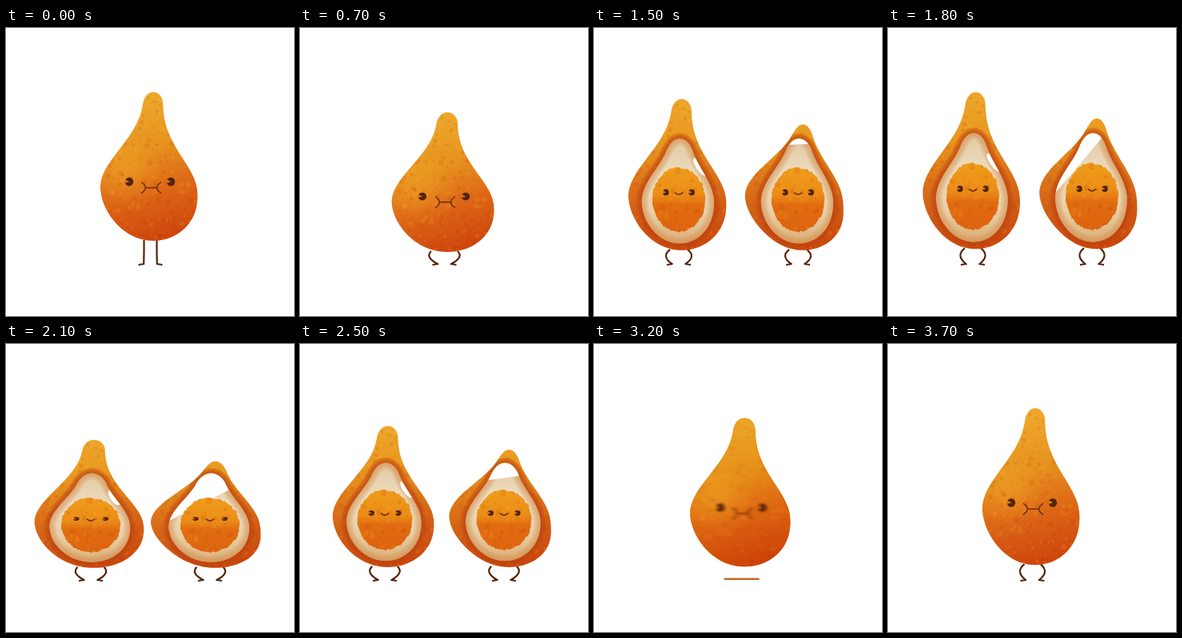
An HTML page with a canvas that plays this animation: 360 px wide and 360 px high, repeating every 3800 ms.

```html
<!DOCTYPE html>
<html lang="en">
<head>
<meta charset="utf-8">
<title>Bouncing fruit</title>
<style>
html, body { margin: 0; width: 100%; height: 100%; overflow: hidden; background: #fff; }
canvas { display: block; width: 100vw; height: 100vh; }
</style>
</head>
<body>
<canvas id="stage" width="360" height="360"></canvas>
<script>
const SIZE = 360, LOOP = 3800, STEP = 100, BEAT = 475, TAU = Math.PI * 2;
const stage = document.getElementById('stage').getContext('2d');
const buffer = document.createElement('canvas');
buffer.width = buffer.height = SIZE;
const layer = buffer.getContext('2d');
const BROWN = '#54240a';

// Pear shapes: heights as shares of the body, widths in half bodies.
const FULL = { top: 0, mid: .66, bottom: 1, width: 1, neck: .2, power: 1.3, lean: .06 };
const CUT = { top: .168, mid: .66, bottom: 1, width: 1, neck: .17, power: 1, lean: .1 };
const FLESH = { top: .262, mid: .68, bottom: .955, width: .74, neck: .3, power: 1, lean: .02 };

const clamp = v => Math.max(0, Math.min(1, v));
const mix = (a, b, k) => a + (b - a) * k;
const easeInOut = k => k < .5 ? 4 * k ** 3 : 1 - 4 * (1 - k) ** 3;

let seed = 11;
const rand = () => (seed = seed * 16807 % 2147483647) / 2147483647;
const grains = Array.from({ length: 600 }, () => ({
  u: rand() * 2 - 1, v: rand(), r: .6 + rand() ** 3 * 3, dark: rand() < .5
}));
const ragged = Array.from({ length: 90 }, () => 1 + (rand() - .5) * .06);

function poseAt(t) {
  const phase = t / BEAT % 1;
  const press = Math.sin(Math.PI * clamp((phase - .06) / .73) ** 1.35);
  const stretch = clamp(1 - Math.min(phase, 1 - phase) / .1);
  const amp = t < BEAT ? .9 : t < 2 * BEAT ? .6 : 1;
  const top = 80 + 42.5 * press * amp;
  const bottom = 276 + 4 * Math.sqrt(press) - 10 * stretch;
  const squash = (press * amp) ** 1.9;
  return { phase, top, bottom, height: bottom - top, half: 60.5 + 8.5 * squash, squash, stretch };
}

function pearWidth(s, v) {
  if (v > s.mid) return s.width * Math.sqrt(clamp(1 - ((v - s.mid) / (s.bottom - s.mid)) ** 2));
  const k = ((v - s.top) / (s.mid - s.top)) ** s.power;
  const cap = Math.sqrt(1 - (1 - clamp((v - s.top) / .08)) ** 2);
  return s.width * cap * mix(s.neck, 1, (1 - Math.cos(Math.PI * k)) / 2);
}

function addPear(c, s, cx, p) {
  const n = 60;
  for (let i = 0; i < 2 * n; i++) {
    const a = Math.PI * i / n;
    const v = mix(s.top, s.bottom, (1 - Math.cos(a)) / 2);
    const lean = s.lean * Math.cos(TAU * (v - s.top) / (1 - s.top));
    const x = cx + p.half * (lean + Math.sign(Math.sin(a)) * pearWidth(s, v));
    c[i ? 'lineTo' : 'moveTo'](x, p.top + v * p.height);
  }
  c.closePath();
}

function pear(c, s, cx, p) {
  c.beginPath();
  addPear(c, s, cx, p);
}

function shade(gradient, ...stops) {
  stops.forEach(([k, color]) => gradient.addColorStop(k, color));
  return gradient;
}

function grain(c, cx, p) {
  for (const g of grains) {
    c.fillStyle = g.dark ? 'rgba(180,50,0,.13)' : 'rgba(255,180,50,.14)';
    c.beginPath();
    c.arc(cx + g.u * p.half, p.top + g.v * p.height, g.r, 0, TAU);
    c.fill();
  }
}

function eye(c, x, y, rx, ry, notch) {
  c.fillStyle = BROWN;
  c.beginPath();
  c.ellipse(x, y, rx, ry, 0, 0, TAU);
  c.fill();
  c.fillStyle = notch;
  c.beginPath();
  c.moveTo(x + rx * .1, y);
  c.lineTo(x - rx, y - ry * .55);
  c.lineTo(x - rx, y + ry * .3);
  c.fill();
}

function wholeFace(c, cx, p) {
  const y = p.top + p.height * .603, m = p.top + p.height * .643;
  for (const s of [-1, 1]) eye(c, cx - .5 + s * (26 + 3 * p.squash), y, 5.2, 5.4 - 1.4 * p.squash, '#dd7a1c');
  c.strokeStyle = '#74300a';
  c.lineWidth = 1.6;
  c.beginPath();
  for (const s of [-1, 1]) {
    c.moveTo(cx + 1 + s * 12.5, m - 7);
    c.quadraticCurveTo(cx + 1 + s * 1.8, m, cx + 1 + s * 12.5, m + 7);
  }
  c.moveTo(cx - 6, m);
  c.lineTo(cx + 8, m);
  c.stroke();
}

function halfFace(c, cx, p) {
  const y = p.top + p.height * .617;
  for (const s of [-1, 1]) eye(c, cx + s * (16 + 2.5 * p.squash), y, 3.8, 4 - 1.8 * p.squash, '#e98a18');
  c.strokeStyle = '#74300a';
  c.lineWidth = 1.6;
  c.beginPath();
  c.moveTo(cx - 5, y);
  c.quadraticCurveTo(cx, y + 5.5, cx + 5, y);
  c.stroke();
}

function yolk(c, cx, p) {
  const y = p.top + p.height * .666, rx = p.half * .545, ry = p.height * .211;
  c.beginPath();
  ragged.forEach((k, i) => {
    const a = i / ragged.length * TAU;
    c.lineTo(cx + Math.cos(a) * rx * k, y + Math.sin(a) * ry * k);
  });
  c.closePath();
  c.save();
  c.clip();
  c.fillStyle = shade(c.createLinearGradient(0, y - ry, 0, y + ry),
    [0, '#ef9c1b'], [.42, '#eb8d17'], [.58, '#e16c10'], [1, '#dd640f']);
  c.fillRect(0, 0, SIZE, SIZE);
  grain(c, cx, p);
  c.restore();
}

function drawWhole(c, cx, p) {
  const { top, bottom, half } = p;
  c.save();
  pear(c, FULL, cx, p);
  c.clip();
  c.fillStyle = shade(c.createLinearGradient(cx - half * .45, top, cx + half * .35, bottom),
    [0, '#efab2e'], [.38, '#e6931f'], [.65, '#de6917'], [1, '#cd430c']);
  c.fillRect(0, 0, SIZE, SIZE);
  const gx = cx - half * .5, gy = top + p.height * .52;
  c.fillStyle = shade(c.createRadialGradient(gx, gy, 2, gx, gy, half * .75),
    [0, 'rgba(240,164,38,.55)'], [1, 'rgba(240,164,38,0)']);
  c.fillRect(0, 0, SIZE, SIZE);
  grain(c, cx, p);
  c.restore();
  wholeFace(c, cx, p);
}

// White glare: a spot on the left half, a swinging slanted edge on the right one.
function glare(c, cx, p, side) {
  const x = u => cx + u * p.half, y = v => p.top + v * p.height;
  c.fillStyle = '#fff';
  c.beginPath();
  if (side) {
    const left = .55 + .25 * Math.sin(TAU * (p.phase - .36));
    const right = .29 - .09 * Math.sin(TAU * (p.phase - .65));
    c.moveTo(x(-.8), y(0));
    c.lineTo(x(-.8), y(left));
    c.lineTo(x(.4), y(right));
    c.lineTo(x(.4), y(0));
  } else {
    c.ellipse(x(.43), y(.45), p.half * .07, p.height * .07, -.6, 0, TAU);
  }
  c.fill();
}

function drawHalf(c, cx, p, side, blurred) {
  const { top, bottom, half } = p;
  c.save();
  pear(c, side ? CUT : FULL, cx, p);
  c.clip();
  c.fillStyle = shade(c.createLinearGradient(cx - half * .2, top, cx + half * .2, bottom),
    [0, '#eda72b'], [.28, '#e8981f'], [.52, '#dc7419'], [.75, '#d05a14'], [1, '#cb470d']);
  c.fillRect(0, 0, SIZE, SIZE);
  grain(c, cx, p);

  pear(c, FLESH, cx, p);
  for (let w = 14; w > 3; w -= 3) {
    c.lineWidth = w;
    c.strokeStyle = 'rgba(190,66,18,.26)';
    c.stroke();
  }
  c.fillStyle = shade(c.createLinearGradient(0, top + p.height * .26, 0, top + p.height * .95),
    [0, '#e3c9a0'], [.35, '#ecdcc0'], [.7, '#e9d0a8'], [1, '#dcae78']);
  c.fill();
  c.clip();
  for (let w = 16; w > 3; w -= 4) {
    c.lineWidth = w;
    c.strokeStyle = 'rgba(208,140,76,.2)';
    c.stroke();
  }
  if (!blurred) glare(c, cx, p, side);
  c.restore();
  yolk(c, cx, p);
  halfFace(c, cx, p);
}

function legs(c, cx, p) {
  const bend = 1 - p.stretch, low = Math.min(1, p.squash * 3);
  const hip = 8 + 2 * bend + 6.5 * low, knee = 8 + 7.5 * bend + 3 * low;
  const hipY = p.bottom - 1, ankle = 8.3, floor = 296;
  c.strokeStyle = BROWN;
  c.lineWidth = 2.2;
  c.lineJoin = 'round';
  c.beginPath();
  for (const s of [-1, 1]) {
    c.moveTo(cx + s * hip, hipY);
    c.quadraticCurveTo(cx + s * (2 * knee - (hip + ankle) / 2), (hipY + floor) / 2 - bend, cx + s * ankle, floor - 1);
    c.lineTo(cx + s * 15, floor);
  }
  c.stroke();
}

function smearedLegs(c, cx, thin) {
  const h = thin ? 2.5 : 18;
  c.fillStyle = thin ? '#c0682c' : '#dcb579';
  c.beginPath();
  c.roundRect(cx - 22, 295 - h, 44, h, h / 3);
  c.fill();
}

// kind: 0 left half, 1 right half, 2 whole
function actor(cx, p, kind, blur) {
  if (cx < -100 || cx > SIZE + 100) return;
  const blurred = blur > 2;
  const paint = (c, x, pose) => kind === 2 ? drawWhole(c, x, pose) : drawHalf(c, x, pose, kind, blurred);
  if (!blurred) {
    legs(stage, cx, p);
    paint(stage, cx, p);
    return;
  }
  smearedLegs(stage, cx, kind > 0);
  layer.clearRect(0, 0, SIZE, SIZE);
  paint(layer, SIZE / 2, { ...p, half: p.half + blur / 3 });

  const shape = kind === 1 ? CUT : FULL, spread = blur / 3;
  stage.save();
  stage.beginPath();
  for (let d = -spread; d <= spread; d += spread) addPear(stage, shape, cx + d, p);
  stage.clip();
  stage.fillStyle = '#e08a24';
  stage.fillRect(0, 0, SIZE, SIZE);
  stage.filter = 'blur(1px)';
  for (let i = 0; i < 11; i++) {
    const off = (i % 2 ? 1 : -1) * Math.ceil(i / 2) / 5 * blur;
    stage.globalAlpha = 1 / (i + 1);
    stage.drawImage(buffer, cx - SIZE / 2 + off, 0);
  }
  stage.restore();
}

function draw(t) {
  const p = poseAt(t);
  const k = clamp((t - 2685) / 600);
  const shift = SIZE * easeInOut(k);
  const blur = Math.min(11, 150 * Math.min(k, 1 - k) ** 2);
  stage.fillStyle = '#fff';
  stage.fillRect(0, 0, SIZE, SIZE);
  if (t < 850) {
    actor(180.5, p, 2, 0);
    return;
  }
  const apart = 1 - (1 - clamp((t - 850) / 250)) ** 3;
  actor(mix(180.5, 255, apart) - shift, p, 1, blur);
  actor(mix(180.5, 106, apart) - shift, p, 0, blur);
  if (k > 0) actor(180.5 + SIZE - shift, p, 2, blur);
}

const start = performance.now();
function tick() {
  const t = (performance.now() - start) % LOOP;
  draw(Math.floor(t / STEP) * STEP);
  requestAnimationFrame(tick);
}
tick();
</script>
</body>
</html>
```
